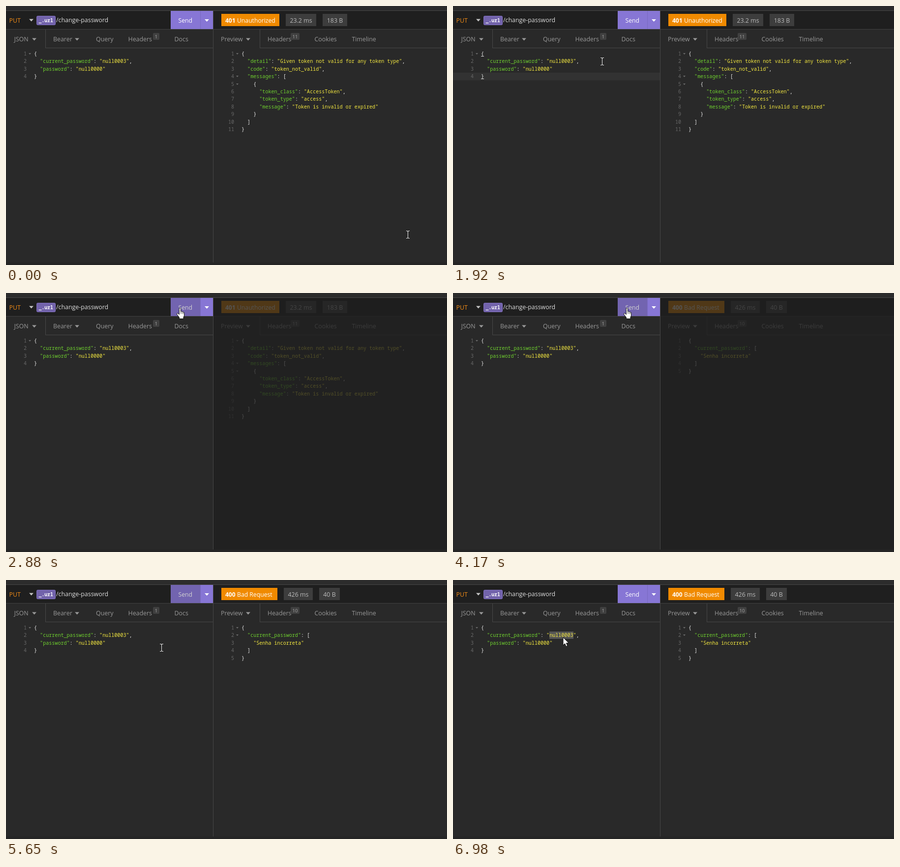
Animation, 897 px wide and 528 px high, one loop 8 s. Source, as an HTML page:

```html
<!DOCTYPE html>
<html lang="en">
<head>
<meta charset="utf-8">
<title>API client</title>
<style>
html, body { margin: 0; width: 100%; height: 100%; overflow: hidden; background: #292929; }
svg { display: block; width: 897px; height: 528px; }
text { white-space: pre; }
.ui { font: 12.4px "Open Sans", "Noto Sans", sans-serif; }
.code { font: 500 10.08px "Noto Sans Mono", "DejaVu Sans Mono", monospace; }
.num { fill: #686868; font-weight: 400; }
.key { fill: #6fd02f; }
.str { fill: #f4e840; }
.pun { fill: #eeeeee; }
</style>
</head>
<body>
<script>
const LOOP = 8000, STEP = 70, CHAR = 6.048;

function add(parent, tag, attrs = {}, text) {
  const el = document.createElementNS("http://www.w3.org/2000/svg", tag);
  for (const k in attrs) el.setAttribute(k, attrs[k]);
  if (text !== undefined) el.textContent = text;
  parent.appendChild(el);
  return el;
}
const group = p => add(p, "g");
const box = (p, x, y, width, height, fill, rx = 0) => add(p, "rect", { x, y, width, height, fill, rx });
const label = (p, x, y, s, fill, extra = {}) => add(p, "text", { class: "ui", x, y, fill, ...extra }, s);
const shape = (p, d, fill, extra = {}) => add(p, "path", { d, fill, ...extra });
const caretDown = (p, x, y, fill) => shape(p, `M${x} ${y}h9l-4.5 5z`, fill);
const baseline = i => 101 + Math.round(i * 15.4);
const show = (el, on) => { el.style.display = on ? "" : "none"; };

const svg = add(document.body, "svg", { viewBox: "0 0 897 528" });
const LINE = "#474747", TAB = "#999999", PURPLE = "#8776d5";

// Frame and panes
box(svg, 0, 0, 897, 528, "#292929");
box(svg, 0, 0, 897, 9, "#2c2c2c");
box(svg, 0, 10, 897, 37, "#1f1f1f");
box(svg, 0, 9, 897, 1, LINE);
box(svg, 0, 47, 897, 1, "#404040");
box(svg, 0, 523, 897, 5, "#252525");

// Editor state layers below the text
const activeLine = box(svg, 0, 136, 421, 15.4, "#323232");
const selection = box(svg, 196, 105, 49, 15, "#555555");

// Request bar
label(svg, 6.5, 34, "PUT", "#ef8a16");
caretDown(svg, 47, 26.5, "#c4c4c4");
box(svg, 62.5, 20.5, 38, 18, "#7263ab", 2).setAttribute("stroke", "#8473c4");
add(svg, "text", { class: "code", x: 66.5, y: 33, fill: "#fff", style: "font-weight:700;font-size:9.8px" }, "_.url");
label(svg, 102, 33, "/change-password", "#dddddd");
const send = group(svg);
box(send, 335, 10, 60, 37, PURPLE);
label(send, 350.5, 34, "Send", "#ffffff", { style: "font-size:12.2px" });
box(svg, 395, 10, 26, 37, PURPLE);
box(svg, 395, 10, 1, 37, "#7969c0");
caretDown(svg, 404, 27, "#ffffff");

function tabs(p, items) {
  for (const [x, s, arrow] of items) {
    label(p, x, 72, s, TAB);
    if (arrow) caretDown(p, arrow, 65.5, TAB);
  }
}
function count(p, x, width, s) {
  box(p, x, 55, width, 14, "#404040", 2);
  return label(p, x + width / 2, 65.8, s, "#a6a6a6", { "text-anchor": "middle", style: "font-size:9.5px" });
}
tabs(svg, [[16.5, "JSON", 53], [96, "Bearer", 140], [183, "Query"], [248.5, "Headers"], [342.5, "Docs"]]);
count(svg, 299, 13, "1");
box(svg, 80, 48, 1, 38, LINE);
box(svg, 80, 85, 341, 1, LINE);

// Response header
tabs(svg, [[437, "Preview", 488], [532, "Headers"], [627.5, "Cookies"], [703.5, "Timeline"]]);
const headerCount = count(svg, 579, 18, "11");
box(svg, 516, 48, 1, 38, LINE);
box(svg, 516, 85, 381, 1, LINE);

function badges(p, width, code, word, chips) {
  box(p, 438, 16, width, 25, "#f08a00");
  label(p, 446, 34, code, "#ffffff", { style: "font-weight:700;font-size:12px" });
  label(p, 470, 34, word, "#ffffff", { style: "font-size:12.2px" });
  for (const [x, w, s] of chips) {
    box(p, x, 16, w, 25, "#3d3d3d");
    label(p, x + w / 2, 34, s, "#bbbbbb", { "text-anchor": "middle" });
  }
}

// Code listing: strings before a colon are keys
function listing(p, x, src, folds) {
  src.split("\n").forEach((line, i) => {
    const y = baseline(i);
    add(p, "text", { class: "code num", x: x - 15, y, "text-anchor": "end" }, i + 1);
    const text = add(p, "text", { class: "code", x, y });
    for (const part of line.match(/"[^"]*"(?=:)|"[^"]*"|[^"]+/g)) {
      const end = line.indexOf(part) + part.length;
      const kind = part[0] !== '"' ? "pun" : line[end] === ":" ? "key" : "str";
      add(text, "tspan", { class: kind }, part);
    }
  });
  const arrows = group(p);
  for (const i of folds) shape(arrows, `M${x - 11} ${baseline(i) - 5}h5l-2.5 3z`, "#6c6c6c");
  return arrows;
}

listing(svg, 57, `{
  "current_password": "null0003",
  "password": "null0000"
}`, [0]);

const before = group(svg), after = group(svg);
badges(before, 118, "401", "Unauthorized", [[569, 62, "23.2 ms"], [644, 50, "183 B"]]);
listing(before, 479, `{
  "detail": "Given token not valid for any token type",
  "code": "token_not_valid",
  "messages": [
    {
      "token_class": "AccessToken",
      "token_type": "access",
      "message": "Token is invalid or expired"
    }
  ]
}`, [0, 3, 4]);
badges(after, 114, "400", "Bad Request", [[565, 59, "426 ms"], [637, 42, "40 B"]]);
const newFolds = listing(after, 479, `{
  "current_password": [
    "Senha incorreta"
  ]
}`, [0, 1]);

const dim = box(svg, 422, 10, 475, 513, "#1f1f1f");
dim.setAttribute("opacity", 0.76);
box(svg, 421, 10, 1, 513, LINE);

// Caret and matched brackets
const brackets = group(svg);
box(brackets, 57, 102, 6, 1, "#dddddd");
box(brackets, 57, 148, 6, 1, "#dddddd");
const caret = box(svg, 63, 137, 1, 14, "#ffffff");

// Pointers, drawn around their hot spot
const pointer = group(svg);
const beam = group(pointer), hand = group(pointer), arrow = group(pointer);
const ibeam = "M-3 -7.5H-1L0.5 -6.5L2 -7.5H4M0.5 -6.5V6.5M-3 7.5H-1L0.5 6.5L2 7.5H4";
shape(beam, ibeam, "none", { stroke: "#1a1a1a", "stroke-width": 2.6 });
shape(beam, ibeam, "none", { stroke: "#f4f4f4", "stroke-width": 1.1 });
shape(hand, "M-.7 1Q-.7-.7 .8-.7T2.4 1V6.5Q3.8 5.5 5 7.2Q6.6 6.5 7.4 8.2Q9.6 7.8 9.6 10V14Q9.6 16 8 18.2V21.5H-.5V19L-5 13Q-6.3 10.8-4.6 10.2Q-3.2 9.8-.7 12.8z",
  "#ffffff", { stroke: "#111", "stroke-width": 1 });
shape(hand, "M2.4 7v4M5 8v3.5M7.4 9v3", "none", { stroke: "#333", "stroke-width": .8 });
shape(arrow, "M0 0V16L3.6 12.6L6 18.4L8.8 17.2L6.4 11.6H11.4z", "#ffffff", { stroke: "#111", "stroke-width": 1 });

// Pointer moves: start, end, x, y
const moves = [
  [70, 630, 293, 178],
  [900, 1040, 274, 155],
  [1380, 1780, 314, 135],
  [1850, 1920, 303, 113],
  [1990, 2480, 353, 31],
  [4690, 5040, 560, 215],
  [5240, 5650, 303, 134],
  [5720, 6000, 247, 121],
  [6070, 6280, 226, 117],
  [6840, 6840, 224, 117],
];
const ease = u => (1 - Math.cos(Math.PI * u)) / 2;

function pointerAt(t) {
  let x = 817, y = 466;
  for (const [start, end, tx, ty] of moves) {
    if (t < start) break;
    const steps = Math.round((end - start) / STEP) + 1;
    const u = ease(Math.min(1, (Math.floor((t - start) / STEP) + 1) / steps));
    x += (tx - x) * u;
    y += (ty - y) * u;
  }
  return [Math.round(x), Math.round(y)];
}

const within = (t, a, b) => t >= a && t < b;
const blink = (t, start) => Math.floor((t - start) / 530) % 2 === 0;

function draw(t) {
  const [x, y] = pointerAt(t);
  const onSend = x >= 335 && x < 395 && y < 47;
  const onText = y > 86 && t < 6840;
  pointer.setAttribute("transform", `translate(${x} ${y})`);
  show(hand, onSend);
  show(beam, onText);
  show(arrow, !onSend && !onText);

  // First click lands on line 4, the second on line 2
  const first = within(t, 1240, 2750), second = within(t, 6480, 6620);
  show(activeLine, first || second);
  activeLine.setAttribute("y", second ? 105.2 : 136);
  show(brackets, first);
  show(caret, second || first && blink(t, 1240));
  caret.setAttribute("x", second ? Math.round(57 + 28 * CHAR) : 63);
  caret.setAttribute("y", second ? 106 : 137);
  show(selection, t >= 6620);

  send.setAttribute("opacity", onSend || within(t, 2750, 6480) ? 0.8 : 1);
  const done = t >= 4170;
  show(before, !done);
  show(after, done);
  show(newFolds, t >= 4490);
  show(dim, within(t, 2880, 4220));
  headerCount.textContent = done ? "10" : "11";
}

const origin = performance.now();
function tick() {
  draw((performance.now() - origin) % LOOP);
  requestAnimationFrame(tick);
}
tick();
</script>
</body>
</html>
```
